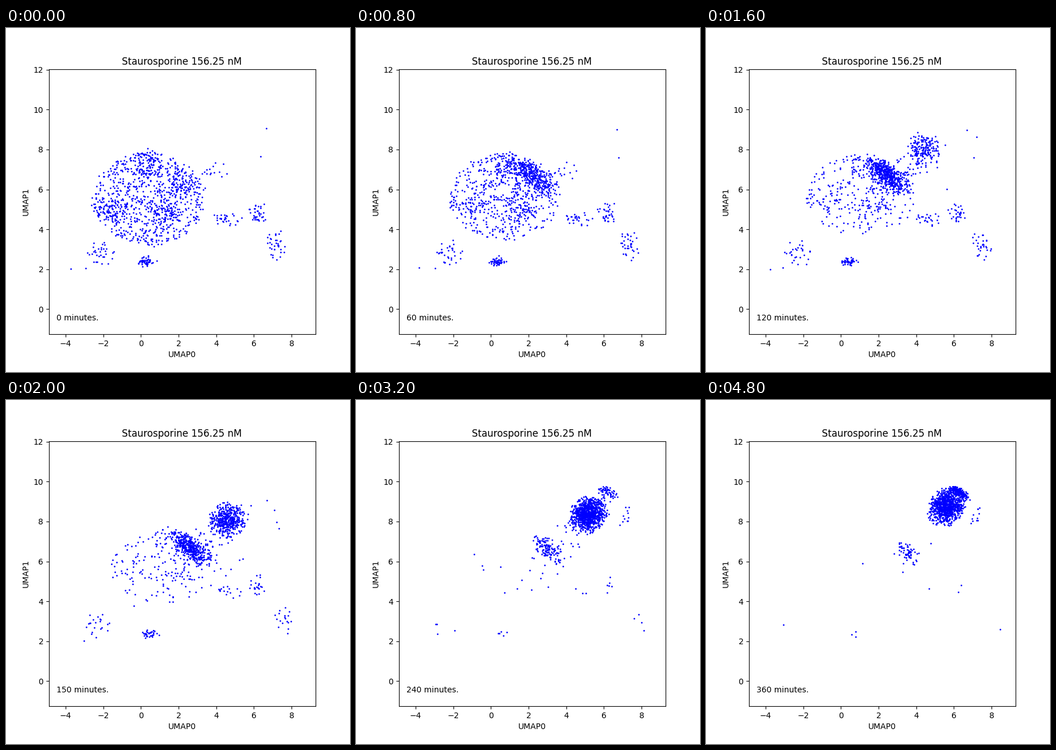
These frames come from a looping animation (600 px wide and 600 px high, 5.2 s). A matplotlib script:

```python
import numpy as np
import matplotlib.pyplot as plt
from matplotlib.animation import FuncAnimation

FRAMES, INTERVAL = 13, 400
STEP_MINUTES = 30
rng = np.random.default_rng(12)


def disc(n):
    """Points spread evenly over the unit disc."""
    return np.sqrt(rng.random(n)) * np.exp(2j * np.pi * rng.random(n))


def bell(n, cut=2.3):
    """Normal scatter without its far tail."""
    u = rng.random(n) * (1 - np.exp(-cut ** 2 / 2))
    return np.sqrt(-2 * np.log(1 - u)) * np.exp(2j * np.pi * rng.random(n))


def place(z, sx, sy, tilt=0):
    return (sx * z.real + 1j * sy * z.imag) * np.exp(1j * np.radians(tilt))


def smooth(x):
    x = np.clip(x, 0, 1)
    return x * x * (3 - 2 * x)


# healthy cells fill a dome, with four denser patches
patches = [-1.65 + 5j, 1.3 + 4.8j, 2 + 6.35j, 0.4 + 7.2j]
dome = [0.4 + 5.55j + place(disc(700), 3.0, 2.3)]
dome += [c + place(bell(75, 2), 0.45, 0.4) for c in patches]
dome = np.concatenate(dome)

# outlying groups: cells, centre, spread in x and y, drift over the loop
fringe = [
    (50, 0.25 + 2.35j, 0.27, 0.13, 0.5),
    (32, -2.1 + 3.0j, 0.45, 0.45, -0.6),
    (28, 4.6 + 4.5j, 0.42, 0.16, 0.5),
    (34, 6.2 + 4.8j, 0.25, 0.33, 0),
    (34, 7.1 + 3.2j, 0.33, 0.42, 1.0),
    (14, 3.9 + 6.8j, 0.35, 0.4, 0.2),
    (1, 6.7 + 9.0j, 0, 0, 0),
    (1, 6.42 + 7.62j, 0, 0, 2),
    (1, -3.7 + 2.05j, 0, 0, -0.3),
    (1, -2.95 + 2.03j, 0, 0, -0.3),
]
outer = np.concatenate([c + place(bell(n, 2), sx, sy) for n, c, sx, sy, _ in fringe])
outer_drift = np.repeat([g[-1] for g in fringe], [g[0] for g in fringe])

N = len(dome) + len(outer)
stress = rng.exponential(0.3, len(dome))         # when a cell heads for the ridge
death = 0.44 * np.exp(0.3 * rng.normal(size=N))  # when it joins the upper mass
death[rng.random(N) < 0.05] = np.inf
ridge = bell(len(dome))
mass = bell(N)
role = rng.random(N)
crest, satellite, halo = role < 0.18, (role > 0.18) & (role < 0.195), role > 0.86
crest_time = rng.uniform(0.45, 0.9, N)
crest_point = 5.9 + 8.75j + 0.85 * np.exp(1j * np.radians(rng.uniform(32, 98, N)))
crest_point += 0.09 * bell(N)
satellite_point = 7.1 + 8.25j + place(bell(N), 0.14, 0.27, -20)


def before_death(t):
    x = dome.real + 2 * t
    y = 7 - (7 - dome.imag) * (1 - 0.4 * t)
    on_ridge = 1.85 + 1.75 * t + 1j * (6.9 - 0.45 * t)
    on_ridge = on_ridge + place(ridge, 0.82 - 0.42 * t, 0.3 - 0.12 * t, -32 - 12 * t)
    move = smooth((t - stress) / 0.12)
    inner = (x + 1j * y) * (1 - move) + on_ridge * move
    return np.concatenate([inner, outer + outer_drift * t])


def after_death(t):
    left = 1.5 * (1 - t)
    centre = 5.6 - 1.25 * left ** 1.5 + 1j * (8.75 - 0.8 * left)
    width = np.where(halo, 0.85 - 0.35 * t, 0.46)
    z = centre + place(mass, width, 0.4, 30)
    rise = np.where(crest, smooth((t - crest_time) / 0.1), 0)
    z = z * (1 - rise) + crest_point * rise
    return np.where(satellite, satellite_point, z)


fig, ax = plt.subplots(figsize=(6, 6), dpi=100)
ax.set(xlim=(-4.885, 9.28), ylim=(-1.25, 12.02), xlabel="UMAP0", ylabel="UMAP1")
ax.set_title("Staurosporine 156.25 nM", x=0.499)
cells, = ax.plot([], [], "b.", markersize=2)
clock = ax.text(-4.5, -0.56, "")


def update(i):
    t = i / (FRAMES - 1)
    shake = np.random.default_rng(i).normal(0, 0.04, (2, N))
    gone = smooth((t - death) / 0.012)
    z = before_death(t) * (1 - gone) + after_death(t) * gone
    cells.set_data(z.real + shake[0], z.imag + shake[1])
    clock.set_text(f"{STEP_MINUTES * i} minutes.")
    return cells, clock


anim = FuncAnimation(fig, update, frames=FRAMES, interval=INTERVAL,
                     init_func=lambda: update(0), repeat=True, repeat_delay=0)
plt.show()
```
